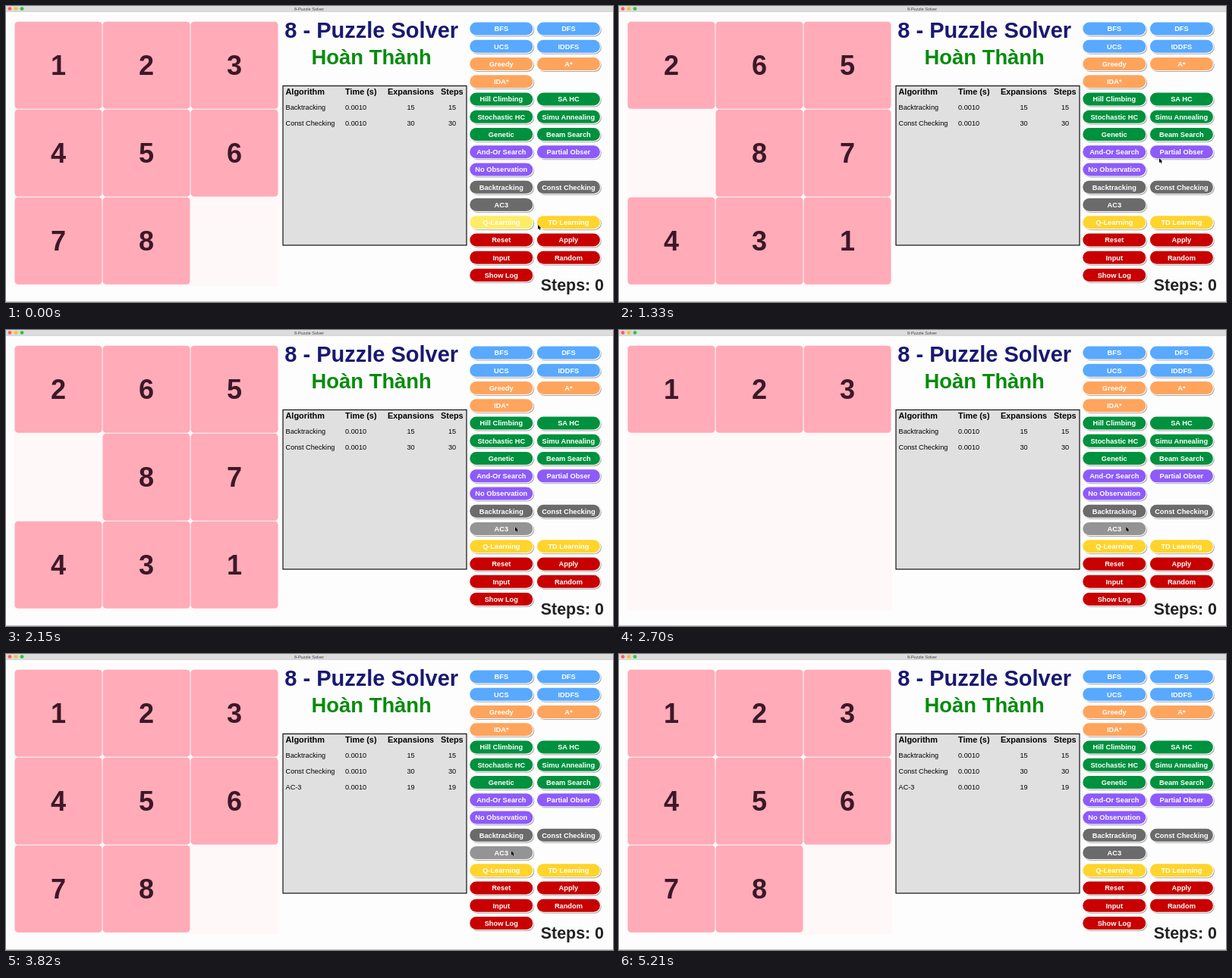
An HTML page for the animation above (5240 ms loop, 800 by 391 pixels).

```html
<!DOCTYPE html>
<html lang="en">
<head>
<meta charset="utf-8">
<title>8-Puzzle Solver</title>
<style>
html, body { margin: 0; width: 100%; height: 100%; overflow: hidden; background: #fdfdfd; }
svg { display: block; width: 800px; height: 391px; font-family: "Liberation Sans", Arial, sans-serif; }
</style>
</head>
<body>
<svg id="stage" viewBox="0 0 800 391"></svg>
<script>
const LOOP = 5240;
const stage = document.getElementById('stage');

function add(tag, attrs, text, parent = stage) {
  const el = document.createElementNS('http://www.w3.org/2000/svg', tag);
  for (const key in attrs) el.setAttribute(key, attrs[key]);
  if (text !== undefined) el.textContent = text;
  parent.appendChild(el);
  return el;
}
const rect = (x, y, width, height, fill, more) => add('rect', { x, y, width, height, fill, ...more });
function label(text, x, y, size, fill, { bold = true, anchor = 'middle', parent } = {}) {
  return add('text', {
    x, y, fill, 'font-size': size, 'font-weight': bold ? 700 : 400, 'text-anchor': anchor
  }, text, parent);
}

// Window
rect(0, 0, 800, 391, '#fdfdfd');
rect(0, 0, 800, 7.5, '#dcdcdc');
rect(0, 7.3, 800, 0.6, '#c4c4c4');
rect(0, 390, 800, 1, '#c8c8c8');
['#ff5f57', '#febc2e', '#28c840'].forEach((fill, i) =>
  add('circle', { cx: 5 + i * 8, cy: 3.6, r: 2.4, fill }));
label('8-Puzzle Solver', 399.5, 5.7, 5.6, '#444', { bold: false });

// Board
rect(11, 20, 349, 350, '#fff8f8');
const cells = Array.from({ length: 9 }, (_, i) => {
  const x = 11.5 + (i % 3) * 116, y = 20.8 + Math.floor(i / 3) * 116;
  const group = add('g', {});
  add('rect', { x, y, width: 115, height: 115, rx: 4.5, fill: '#ffabb8' }, undefined, group);
  return { group, digit: label('', x + 57.5, y + 70.2, 36, '#3c1828', { parent: group }) };
});

// Headings
label('8 - Puzzle Solver', 481.7, 42, 29, '#191970');
label('Hoàn Thành', 481.7, 77, 27.4, '#068c0c');
label('Steps: 0', 788, 376, 21.4, '#222', { anchor: 'end' });

// Results
const columns = [368.5, 447, 528.5, 583];
rect(365, 105.5, 242, 210.5, '#e0e0e0', { stroke: '#111', 'stroke-width': 1.2 });
['Algorithm', 'Time (s)', 'Expansions', 'Steps'].forEach((text, i) =>
  label(text, [368.5, 447, 503, 573][i], 117, 10.9, '#000', { anchor: 'start' }));
function resultRow(name, count, y) {
  const parent = add('g', {});
  [name, '0.0010', count, count].forEach((text, i) =>
    label(text, columns[i], y, 9.2, '#000', { bold: false, anchor: 'start', parent }));
  return parent;
}
resultRow('Backtracking', 15, 137);
resultRow('Const Checking', 30, 158);
const newResult = resultRow('AC-3', 19, 179);

// Buttons: [normal, hovered]
const palette = {
  blue: ['#58a9ff', '#86c2ff'], orange: ['#ffa45c', '#ffc08c'], green: ['#00913e', '#30b366'],
  purple: ['#8d5bfa', '#aa84ff'], gray: ['#6b6b6b', '#949494'], yellow: ['#ffd42c', '#ffec66'],
  red: ['#c80000', '#ff2e2e']
};
const buttons = [];
[
  ['blue', 'BFS', 'DFS'], ['blue', 'UCS', 'IDDFS'], ['orange', 'Greedy', 'A*'], ['orange', 'IDA*'],
  ['green', 'Hill Climbing', 'SA HC'], ['green', 'Stochastic HC', 'Simu Annealing'],
  ['green', 'Genetic', 'Beam Search'], ['purple', 'And-Or Search', 'Partial Obser'],
  ['purple', 'No Observation'], ['gray', 'Backtracking', 'Const Checking'], ['gray', 'AC3'],
  ['yellow', 'Q-Learning', 'TD Learning'], ['red', 'Reset', 'Apply'], ['red', 'Input', 'Random'],
  ['red', 'Show Log']
].forEach(([color, ...names], row) => names.forEach((name, col) => {
  const cx = 653 + col * 88.6, cy = 30.1 + row * 23.25;
  const pill = (dx, dy, w, h, fill) =>
    rect(cx - w / 2 + dx, cy - h / 2 + dy, w, h, fill, { rx: h / 2 });
  pill(1.2, 1.3, 84, 18, '#a9a9a9');
  pill(0.2, 0.2, 84.4, 18.4, '#fff');
  const face = pill(-0.2, 0, 83, 17, palette[color][0]);
  label(name, cx - 0.2, cy + 3.3, 9.25, '#fff');
  buttons.push({ cx, cy, face, colors: palette[color] });
}));

const pointer = add('path', {
  d: 'M0 0V6L1.4 4.8L2.4 7L3.4 6.5L2.5 4.4H4.3Z',
  fill: '#000', stroke: '#fff', 'stroke-width': 0.5, 'paint-order': 'stroke'
});

// Pointer stops: time, x, y
const stops = [
  [-60, 689, 286], [0, 701, 289], [220, 690, 306], [670, 693, 307], [800, 693, 307],
  [1220, 712, 201], [1420, 712, 201], [1850, 672, 260], [2150, 671, 260],
  [3210, 666, 260], [3860, 666, 260], [4230, 794, -9]
];
function pointerAt(t) {
  const next = stops.findIndex(stop => stop[0] > t);
  if (next < 0) return [794, -9];
  const [t0, x0, y0] = stops[next - 1], [t1, x1, y1] = stops[next];
  const u = (t - t0) / (t1 - t0), k = u * u * (3 - 2 * u);
  return [x0 + (x1 - x0) * k, y0 + (y1 - y0) * k];
}

const RESET = 360, CLEAR = 2400, FILL = 2480, FILL_STEP = 80, RESULT = 3300;
function boardAt(t) {
  if (t >= RESET && t < CLEAR) return '265 87431';
  const filled = t < RESET ? 8 : Math.max(0, Math.floor((t - FILL) / FILL_STEP) + 1);
  return '12345678'.slice(0, filled).padEnd(9);
}

function draw(t) {
  const board = boardAt(t);
  cells.forEach(({ group, digit }, i) => {
    group.style.display = board[i] === ' ' ? 'none' : '';
    digit.textContent = board[i];
  });
  newResult.style.display = t >= RESULT ? '' : 'none';

  const [x, y] = pointerAt(t);
  pointer.setAttribute('transform', `translate(${x} ${y})`);
  // The highlight trails the pointer slightly.
  const [hx, hy] = pointerAt(t - 60);
  buttons.forEach(({ cx, cy, face, colors }) => {
    const over = Math.abs(hx - cx) < 42 && Math.abs(hy - cy) < 8;
    face.setAttribute('fill', colors[over ? 1 : 0]);
  });
}

const start = performance.now();
function tick() {
  draw((performance.now() - start) % LOOP);
  requestAnimationFrame(tick);
}
tick();
</script>
</body>
</html>
```
